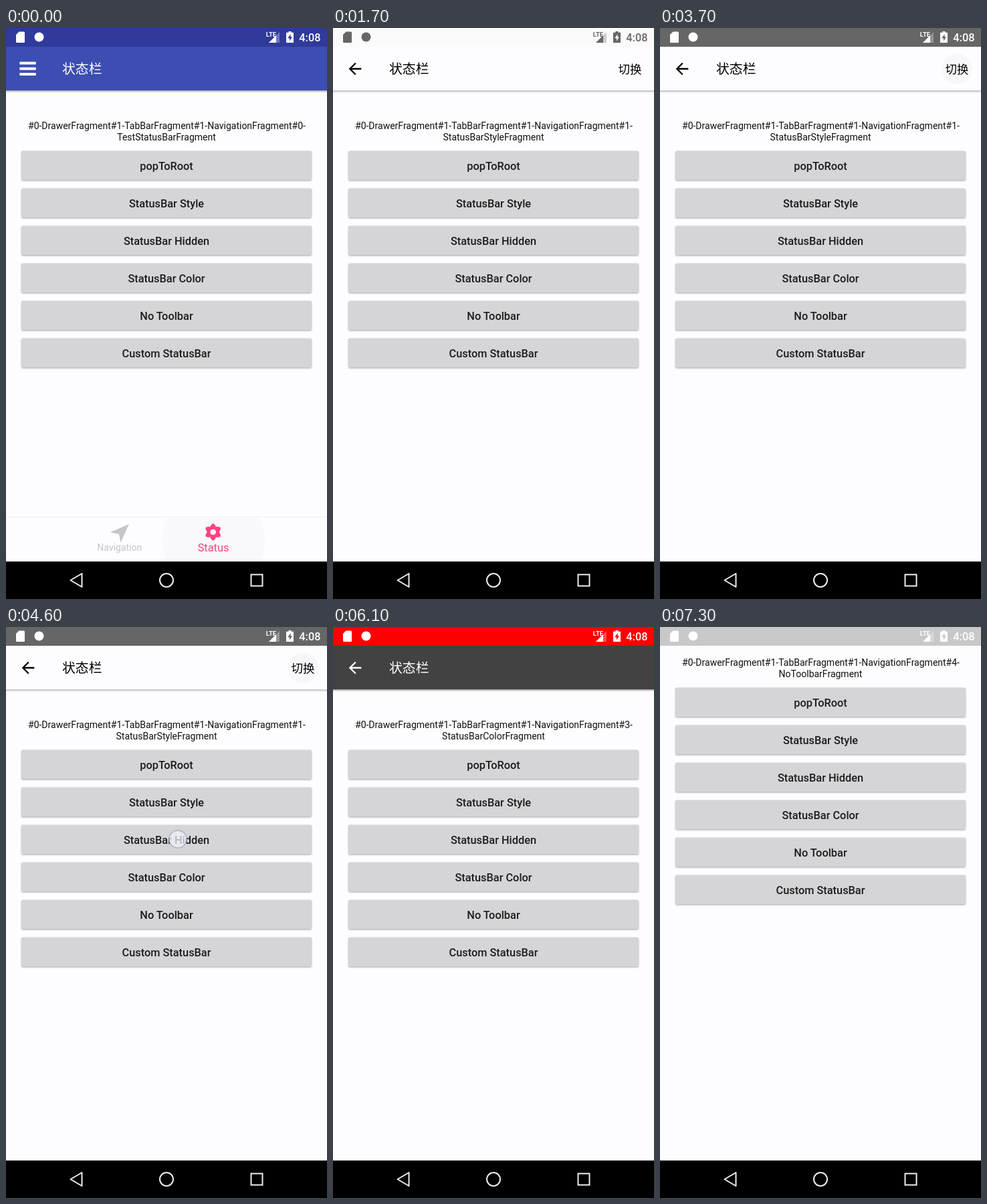
These frames come from a looping animation (480 px wide and 853 px high, 8 s). An HTML page:

```html
<!DOCTYPE html>
<html lang="zh">
<head>
<meta charset="utf-8">
<title>状态栏</title>
<style>
html, body { margin: 0; width: 100%; height: 100%; overflow: hidden; background: #000; }
svg { display: block; width: 100%; height: 100%; }
text { font-family: Roboto, "Noto Sans CJK SC", "Noto Sans CJK", sans-serif; }
.mid { text-anchor: middle; }
.medium { font-weight: 500; }
</style>
</head>
<body>
<svg id="stage" viewBox="0 0 480 853"></svg>
<script>
const LOOP = 8000, STEP = 100, SLIDE = 250, W = 480;
const BG = '#fdfcfe', INK = '#1c1c1d', PINK = '#ff4081';
const BUTTONS = ['popToRoot', 'StatusBar Style', 'StatusBar Hidden',
  'StatusBar Color', 'No Toolbar', 'Custom StatusBar'];

// status: RGBA drawn behind the system icons
const PAGES = [
  { name: 'TestStatusBarFragment', index: 0, bar: '#3c4eb2', fg: '#fff', status: [48, 58, 155, 1], menu: true },
  { name: 'StatusBarStyleFragment', index: 1, bar: BG, fg: '#000', status: [250, 250, 250, 1], action: true },
  { name: 'StatusBarHiddenFragment', index: 2, bar: '#3c4eb2', fg: '#fff', status: [60, 78, 178, 0], hidden: true },
  { name: 'StatusBarColorFragment', index: 3, bar: '#424242', fg: '#fff', status: [255, 0, 0, 1] },
  { name: 'NoToolbarFragment', index: 4, status: [200, 200, 200, 1] }
];
const PUSHES = [1410, 4690, 5817, 7010];
const GREY_STATUS = [102, 102, 102, 1];
const TAPS = [
  { at: 1300, hold: 200, x: 260, y: 261 },
  { at: 3100, hold: 200, x: 444, y: 61 },
  { at: 4500, hold: 200, x: 257, y: 317 },
  { at: 5700, hold: 100, x: 257, y: 373 },
  { at: 6900, hold: 100, x: 256, y: 426 }
];

const label = (x, y, size, fill, str, cls = '') =>
  `<text x="${x}" y="${y}" font-size="${size}" fill="${fill}" class="${cls}">${str}</text>`;
const rect = (x, y, w, h, fill, extra = '') =>
  `<rect x="${x}" y="${y}" width="${w}" height="${h}" fill="${fill}" ${extra}/>`;

function toolbar(p) {
  const icon = p.menu
    ? [50.5, 58.8, 67].map(y => rect(20.3, y, 24.5, 4, p.fg, 'rx="1"')).join('')
    : `<path transform="translate(19 47) scale(1.1667)" fill="${p.fg}"
        d="M20 11H7.83l5.59-5.59L12 4l-8 8 8 8 1.41-1.41L7.83 13H20z"/>`;
  const action = p.action
    ? '<circle id="ripple" cx="444" cy="61" r="23"/>' + label(444, 67.5, 17.5, p.fg, '切换', 'mid') : '';
  return rect(0, 93, W, 4, 'url(#drop)') + rect(0, 0, W, 93.3, p.bar) + icon +
    label(84, 68, 19.83, p.fg, '状态栏') + action;
}

function button(str, i) {
  const y = 183.5 + i * 56;
  return rect(23, y, 434, 43.6, '#d5d4d6', 'rx="2" filter="url(#lift)"') +
    label(240, y + 28.2, 16.33, INK, str, 'mid medium');
}

function tabs() {
  const petals = [0, 60, 120, 180, 240, 300].map(a =>
    `<path transform="rotate(${a})" d="M-4.4 -5.5Q-4.6 -10.5 0 -13Q4.6 -10.5 4.4 -5.5L0 0z"/>`).join('');
  return rect(0, 730, W, 1, '#efeef0') +
    '<circle id="tabRipple" cx="310" cy="764" r="77" fill="#000" clip-path="url(#tabClip)"/>' +
    '<path d="M184 741L171.500 769L169 756L155.500 753.500z" fill="#c6c5c8"/>' +
    label(169.8, 781, 14, '#c6c5c8', 'Navigation', 'mid') +
    `<g transform="translate(309.7 753)" fill="${PINK}">${petals}<circle r="8"/><circle r="4.3" fill="${BG}"/></g>` +
    label(310, 781.5, 16.33, PINK, 'Status', 'mid');
}

function page(p, i) {
  const path = `#0-DrawerFragment#1-TabBarFragment#1-NavigationFragment#${p.index}-`;
  return `<g id="page${i}">${rect(0, 0, W, 797, BG)}${p.bar ? toolbar(p) : ''}
    <g transform="translate(0 ${p.bar ? 0 : -93})">
    ${label(240.5, 151, 14, '#111', path, 'mid')}${label(240, 168, 14, '#111', p.name, 'mid')}
    ${BUTTONS.map(button).join('')}</g>${p.menu ? tabs() : ''}</g>`;
}

const statusIcons = `<g id="icons">
  <path d="M19.500 5.500H26.500Q28 5.500 28 7V20.500Q28 22 26.500 22H16.500Q15 22 15 20.500V10z"/>
  <circle cx="49.500" cy="13.500" r="7"/>
  <text x="388.800" y="13" font-size="9.500" font-weight="700" textLength-adjust="none">LTE</text>
  <path d="M409 6V22H393z" opacity=".3"/><path d="M404 11V22H393z"/>
  <path fill-rule="evenodd" d="M422.500 5H426.500V6.800H430V22H419V6.800H422.500zM425.500 9L421.300 15.300H424V19.500L428 13.200H425.500z"/>
  <text x="438.300" y="20.200" font-size="16.330" class="medium">4:08</text></g>`.replace(' textLength-adjust="none"', '');

const navBar = rect(0, 797, W, 56, '#000') + `<g fill="none" stroke="#eee" stroke-width="2">
  <path d="M113.500 815V835L96.500 825z" stroke-linejoin="round"/>
  <circle cx="240" cy="825" r="10"/><rect x="366.500" y="816.500" width="17" height="17"/></g>`;

const stage = document.getElementById('stage');
stage.innerHTML = `<defs>
  <linearGradient id="drop" x2="0" y2="1"><stop stop-opacity=".3"/><stop offset="1" stop-opacity="0"/></linearGradient>
  <filter id="lift" x="-2%" y="-10%" width="104%" height="125%">
    <feDropShadow dx="0" dy="1.3" stdDeviation="1.1" flood-opacity=".32"/></filter>
  <clipPath id="tabClip"><rect y="731" width="480" height="66"/></clipPath></defs>
  ${PAGES.map(page).join('')}${rect(0, 0, W, 28, 'none', 'id="status"')}${statusIcons}${navBar}
  <circle id="tap" r="13" fill="#f3f2f6" fill-opacity=".72" stroke="#9ea6cc" stroke-opacity=".8" stroke-width="1.600"/>`;

const $ = id => document.getElementById(id);
const clamp = v => Math.min(1, Math.max(0, v));
const decelerate = v => 1 - (1 - clamp(v)) ** 2;
const mix = (a, b, k) => a.map((v, i) => v + (b[i] - v) * k);
const set = (id, attrs) => { for (const k in attrs) $(id).setAttribute(k, attrs[k]); };

function draw(t) {
  const pos = PUSHES.reduce((sum, at) => sum + decelerate((t - at) / SLIDE), 0);
  PAGES.forEach((p, i) => set('page' + i, { transform: `translate(${(i - pos) * W} 0)` }));

  const toggle = clamp((t - 3150) / 200);
  const from = Math.floor(pos), to = Math.min(from + 1, PAGES.length - 1), k = pos - from;
  const tone = i => i === 1 ? mix(PAGES[1].status, GREY_STATUS, toggle) : PAGES[i].status;
  const shown = i => PAGES[i].hidden ? 0 : 1;
  const [r, g, b, a] = mix(tone(from), tone(to), k);
  const dark = Math.round(pos) === 1 && toggle < 0.5;
  set('status', { fill: `rgb(${r | 0},${g | 0},${b | 0})`, 'fill-opacity': a });
  set('icons', { fill: dark ? '#666' : '#fff', opacity: shown(from) + (shown(to) - shown(from)) * k });

  set('tabRipple', { opacity: t < 100 ? 0.016 : t < 200 ? 0.008 : 0 });
  set('ripple', { opacity: t < 3200 ? 0 : t < 3400 ? 0.1 : t < 3700 ? 0.05 : 0.022 });

  const tap = TAPS.find(p => t >= p.at && t < p.at + p.hold);
  set('tap', tap ? { cx: tap.x, cy: tap.y, opacity: 1 } : { opacity: 0 });
}

const start = performance.now();
function tick() {
  const t = Math.max(0, performance.now() - start) % LOOP;
  draw(Math.floor(t / STEP) * STEP);
  requestAnimationFrame(tick);
}
tick();
</script>
</body>
</html>
```
